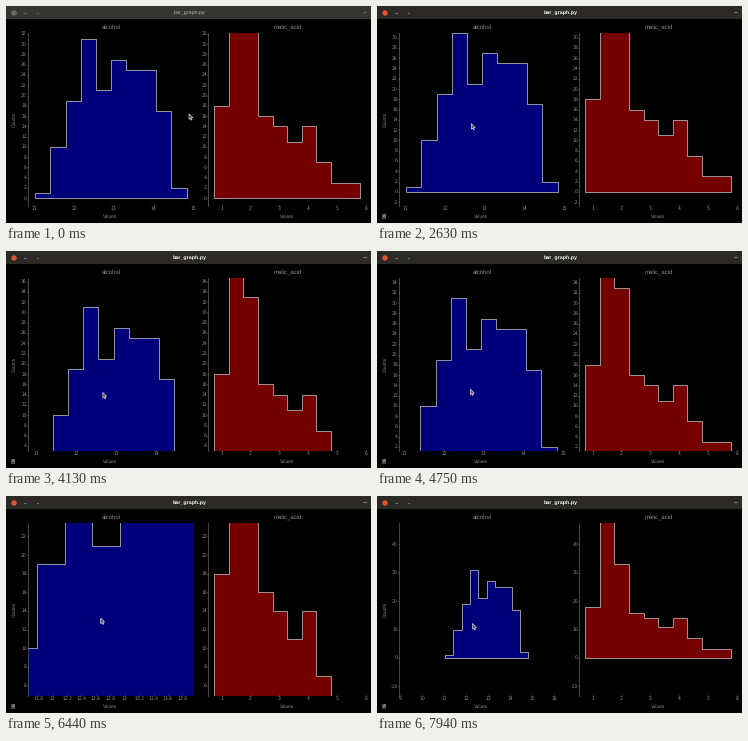
Recreate the animation shown at these times as a matplotlib script. Size 365 by 217 pixels, loop 8 s.

```python
import numpy as np
import matplotlib.pyplot as plt
from matplotlib.animation import FuncAnimation
from matplotlib.patches import Circle, Polygon, Rectangle

W, H, DPI = 365, 217, 100
FRAMES, INTERVAL = 128, 62.5
TOP, BOTTOM = 26.5, 199.5
ZOOM = 1.02 ** 15                      # one wheel notch
PX, PY = 39.8, 5.14                    # pixels per unit before zooming
GREY = "#8c8c8c"

plt.rcParams.update({"font.family": "Liberation Sans", "text.hinting": "none",
                     "toolbar": "None"})


def px(size):
    return size * 72 / DPI


fig = plt.figure(figsize=(W / DPI, H / DPI), dpi=DPI, facecolor="black")
ax = fig.add_axes([0, 0, 1, 1])
ax.set(xlim=(0, W), ylim=(H, 0))
ax.axis("off")


def text(x, y, s, size, color=GREY, **kw):
    return ax.text(x, y, s, fontsize=px(size), color=color, ha="center",
                   va="center", **kw)


def line(xs, ys, color=GREY, width=0.6):
    return ax.plot(xs, ys, color=color, lw=px(width))[0]


def multiples(a, b, step):
    """Multiples of step between a and b."""
    return np.arange(np.ceil(a / step), np.floor(b / step) + 1) * step


class Histogram:
    def __init__(self, title, counts, first, last, left, right, fill):
        self.left, self.right = left, right
        edges = np.linspace(first, last, len(counts) + 1)
        self.xs = np.repeat(edges, 2)
        self.ys = np.r_[0, np.repeat(counts, 2), 0]
        self.shape = Polygon([[0, 0]], closed=True, fc=fill, ec="#c0c0c0",
                             lw=px(0.75), joinstyle="miter")
        ax.add_patch(self.shape)
        self.shape.set_clip_path(Rectangle((left, TOP), right - left, BOTTOM - TOP,
                                           transform=ax.transData))
        line([left, left], [TOP, BOTTOM], "#747474")
        mid = (left + right) / 2
        text(mid, 21, title, 6)
        text(mid - 0.5, 210.7, "Values", 4.7)
        self.pool = [text(0, 0, "", 4.5, family="DejaVu Sans") for _ in range(45)]
        self.ticks = line([], [], "#6e6e6e", 0.5)

    def draw(self, x0, y0, sx, sy):
        """x0, y0: pixel position of the data origin; sx, sy: pixels per unit."""
        self.shape.set_xy(np.c_[x0 + self.xs * sx, y0 - self.ys * sy])
        labels, ticks = [], []
        for v in multiples((y0 - BOTTOM) / sy, (y0 - TOP) / sy, 2 if sy > 4.5 else 10):
            y = y0 - v * sy
            labels.append((self.left - 1.2, y, v, "right"))
            ticks += [(self.left - 1.2, y), (self.left, y), (np.nan, y)]
        for v in multiples((self.left - x0) / sx, (self.right - x0) / sx,
                           0.2 if sx > 60 else 1):
            x = x0 + v * sx
            labels.append((x, 202.5, v, "center"))
            ticks += [(x, BOTTOM - 0.5), (x, BOTTOM + 0.7), (np.nan, 0)]

        for label in self.pool:
            label.set_text("")
        for label, (x, y, v, ha) in zip(self.pool, labels):
            label.set(x=x, y=y, text=f"{v + 0:.4g}", ha=ha)
        self.ticks.set_data(*np.transpose(ticks))


alcohol = Histogram("alcohol", [1, 10, 19, 31, 21, 27, 25, 25, 17, 2],
                    11.03, 14.83, 22, 188, "#00007a")
malic = Histogram("malic_acid", [18, 59, 33, 16, 14, 11, 14, 7, 3, 3],
                  0.74, 5.80, 202.2, 361, "#740000")
text(8, 113, "Counts", 4.7, rotation=90)

# window frame
bar = Rectangle((0, 0), W, 13, ec="none")
close = Circle((8, 7), 2.7, ec="none")
ax.add_patch(bar)
ax.add_patch(close)
title = text(183.5, 7, "bar_graph.py", 5.4)
icons = [line([x, x + w], [y, y], width=0.6)
         for x, y, w in [(18.3, 7, 1.4), (30.7, 7, 1), (357, 5.5, 2.8)]]

# auto-range button
auto = [ax.add_patch(Rectangle((5, 207.5), 4.4, 5, fc="#4a4a4a", ec="none")),
        text(7.2, 210.2, "A", 4.4, "#d0d0d0")]

ARROW = np.array([(0, 0), (0, 5.6), (1.4, 4.6), (2.2, 6.4), (3, 6), (2.3, 4.2), (3.9, 4)])
cursor = Polygon(ARROW, closed=True, fc="#505050", ec="#e8e8e8", lw=px(0.6), zorder=9)
ax.add_patch(cursor)


def ease(f, start, end):
    u = np.clip((f - start) / (end - start), 0, 1)
    return u * u * (3 - 2 * u)


def drag(f):
    """Offset of the plot while it is dragged up, down and up again."""
    rise = 1 - (1 - np.clip((f - 40) / 13, 0, 1)) ** 1.6
    dx = 2.6 * ease(f, 53, 66) - 3.6 * ease(f, 66, 76) + 1.4 * ease(f, 76, 82)
    dy = -27.5 * rise + 57.5 * ease(f, 53, 69.5) - 32 * ease(f, 69.5, 82.5)
    return np.array([dx, dy])


def nudge(f):
    """Short drag at the end of the loop."""
    return np.array([9, 2]) * np.clip((f - 124) / 3, 0, 1)


def pointer(f):
    if f < 40:                         # glide in from the right, then down
        return (183 - 26 * ease(f, 20, 23) - 63 * ease(f, 25, 31),
                107.7 + 5.3 * ease(f, 25, 31) + 11 * ease(f, 33, 35))
    if f < 120:
        lag = 1.5 * ease(f, 53, 60) * (1 - ease(f, 66, 70))
        return np.array([94.3, 124]) + drag(f - lag)
    return np.array([86.5, 125.5]) + nudge(f)


def notches(f):
    """Wheel clicks so far: three in, then five out at an even pace."""
    zoomed_in = sum(f >= 91 + 2 * k for k in range(3))
    zoomed_out = sum(f >= int(103 + 2.5 * k) for k in range(5))
    return zoomed_in - zoomed_out


def draw(f):
    z = ZOOM ** int(notches(f))
    focus = np.array([95, 122.5])
    x12, y0 = focus + (np.array([67.9, 192.3]) + drag(f) - focus) * z + nudge(f)
    alcohol.draw(x12 - 12 * PX * z, y0, PX * z, PY * z)
    malic.draw(186.9, y0, 28.83, PY * z)

    active = f >= 38
    bar.set_facecolor("#2b2a27" if active else "#353533")
    close.set_facecolor("#e2542f" if active else "#6a6a67")
    title.set(color="#f4f4f4" if active else "#b4b4b0",
              weight="bold" if active else "normal")
    for icon in icons:
        icon.set_color("#b0b0ac" if active else "#8a8a86")
    for a in auto:
        a.set_visible(f >= 41)
    cursor.set_xy(ARROW + pointer(f))
    return []


anim = FuncAnimation(fig, draw, frames=FRAMES, interval=INTERVAL, init_func=lambda: draw(0),
                     repeat=True, repeat_delay=0, blit=False)
plt.show()
```
